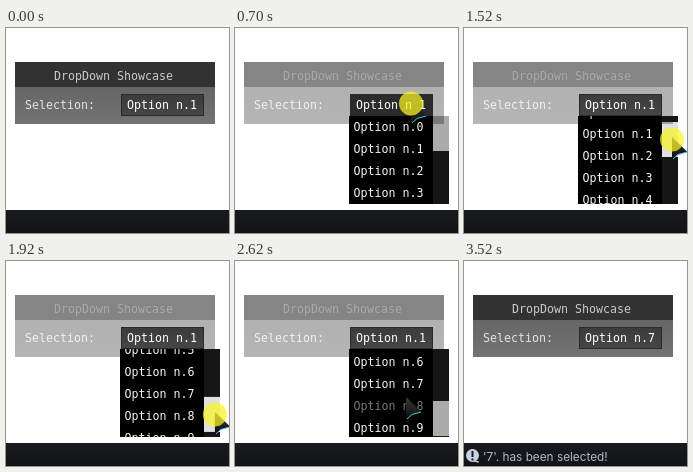
An HTML page with a canvas that plays this animation: 223 px wide and 205 px high, repeating every 4020 ms.

```html
<!DOCTYPE html>
<html>
<head>
<meta charset="utf-8">
<style>
html, body { margin: 0; width: 100%; height: 100%; overflow: hidden; background: #fff; }
canvas { display: block; }
</style>
</head>
<body>
<canvas id="stage" width="223" height="205"></canvas>
<script>
const ctx = document.getElementById('stage').getContext('2d');
const LOOP = 4020;
const MONO = '11.63px "DejaVu Sans Mono", monospace';
const UI = '11.8px Inter, sans-serif';
const LIST = { x: 114, y: 88, w: 84, h: 88, row: 22 };
const THUMB = 35, RATIO = 0.4, GRAB_Y = 103, MAX_SCROLL = 130;

// Where the pointer rests or turns; it eases from one point to the next
const stops = [
  { t: 300, x: 213, y: 112 },
  { t: 600, x: 176, y: 73 },
  { t: 800, x: 176, y: 73 },
  { t: 1200, x: 190, y: 146 },
  { t: 1520, x: 208, y: 109 },
  { t: 2010, x: 209, y: 155 },
  { t: 2120, x: 209, y: 155 },
  { t: 2620, x: 171, y: 136 },
  { t: 2820, x: 166, y: 121 },
  { t: 2920, x: 166, y: 121 },
  { t: 3520, x: 224, y: 95 }
];

const between = (v, a, b) => v >= a && v < b;
const clamp = (v, lo, hi) => Math.max(lo, Math.min(hi, v));
const ease = k => k * k * (3 - 2 * k);

function rect(x, y, w, h, fill) {
  ctx.fillStyle = fill;
  ctx.fillRect(x, y, w, h);
}

function text(str, x, y, fill, font = MONO) {
  ctx.font = font;
  ctx.fillStyle = fill;
  ctx.fillText(str, x, y);
}

function disc(x, y, r, fill) {
  ctx.fillStyle = fill;
  ctx.beginPath();
  ctx.arc(x, y, r, 0, 7);
  ctx.fill();
}

function fade(y0, y1, a, b) {
  const g = ctx.createLinearGradient(0, y0, 0, y1);
  g.addColorStop(0, a);
  g.addColorStop(1, b);
  return g;
}

// The picture holds between steps of 100 ms
function snap(t) {
  if (t < 300) return 0;
  if (t < 1520) return Math.min(1400, Math.floor(t / 100) * 100);
  return Math.min(3520, Math.floor((t - 20) / 100) * 100 + 20);
}

function pointerAt(t) {
  const i = stops.findIndex(s => s.t > t);
  if (i < 1) return null;
  const a = stops[i - 1], b = stops[i];
  const k = ease((t - a.t) / (b.t - a.t));
  return { x: a.x + (b.x - a.x) * k, y: a.y + (b.y - a.y) * k };
}

function drawPanel(open, pressed, choice) {
  rect(9, 34, 200, 25, open ? '#858585' : '#323232');
  rect(9, 59, 200, 37, open ? fade(59, 96, '#b1b1b1', '#b5b5b5') : fade(59, 96, '#666', '#737373'));
  text('DropDown Showcase', 48, 52, open ? '#a9a9a9' : '#cacaca');
  text('Selection:', 19, 81, open ? '#f0f0f0' : '#e4e4e4');
  rect(115, 66, 83, 22, '#2a2a2a');
  rect(116, 67, 81, 20, pressed ? '#2b2b2b' : fade(67, 87, '#3c3c3c', '#464646'));
  text('Option n.' + choice, 121, 81, '#fff');
}

function drawList(scroll, dragging, pointer) {
  const { x, y, w, h, row } = LIST;
  const right = x + w, top = y + scroll * RATIO, end = top + THUMB;
  rect(x, y, w, h, '#000');
  rect(right, y, 16, top - y, '#161616');
  rect(right, top, 16, THUMB, dragging ? 'rgba(0,0,0,.12)' : 'rgba(0,0,0,.33)');
  rect(right, end, 16, y + h - end, '#161616');

  const inside = between(pointer.x, x, right) && between(pointer.y, y, y + h);
  const hover = inside ? Math.floor((pointer.y - y + scroll) / row) : -1;
  ctx.save();
  ctx.beginPath();
  ctx.rect(x, y, w, h);
  ctx.clip();
  for (let i = 0; i < 10; i++)
    text('Option n.' + i, 118.4, 103 + i * row - scroll, i === hover ? '#777' : '#f4f4f4');
  ctx.restore();
}

function drawPointer({ x, y }, click) {
  ctx.save();
  ctx.translate(x, y);
  ctx.fillStyle = fade(0, 23, '#383838', '#0c0c0c');
  ctx.fill(new Path2D('M0 0V23L6 17.5L15.5 15Z'));
  ctx.strokeStyle = '#4cc3dc';
  ctx.stroke(new Path2D('M1 22L6 17.5L15 15'));
  if (click) disc(0, 2.5, 12, 'rgba(250,245,35,.73)');
  ctx.restore();
}

function drawStatus(message) {
  rect(0, 182, 223, 23, fade(182, 205, '#181a1e', '#111317'));
  if (!message) return;
  disc(8.5, 194.5, 6.5, '#c6d2e3');
  ctx.fill(new Path2D('M9 200H14.5V202Z'));
  rect(7.5, 190, 2, 6, '#17191d');
  rect(7.5, 197.5, 2, 2, '#17191d');
  text(message, 19, 200, '#b4bac3', UI);
}

function draw(now) {
  const t = snap(now % LOOP);
  const pointer = pointerAt(t);
  const pressed = between(t, 600, 800);
  const open = between(t, 700, 2920);
  const dragging = between(t, 1520, 2120);
  const chosen = t >= 2920;

  rect(0, 0, 223, 205, '#fff');
  drawPanel(open, pressed, chosen ? 7 : 1);
  drawStatus(chosen ? "'7'. has been selected!" : '');
  if (open) {
    const dragged = clamp((pointer.y - GRAB_Y) / RATIO, 0, MAX_SCROLL);
    drawList(t < 1520 ? 0 : dragging ? dragged : MAX_SCROLL, dragging, pointer);
  }
  if (pointer) drawPointer(pointer, pressed || dragging || t === 2820);
  requestAnimationFrame(draw);
}
requestAnimationFrame(draw);
</script>
</body>
</html>
```
